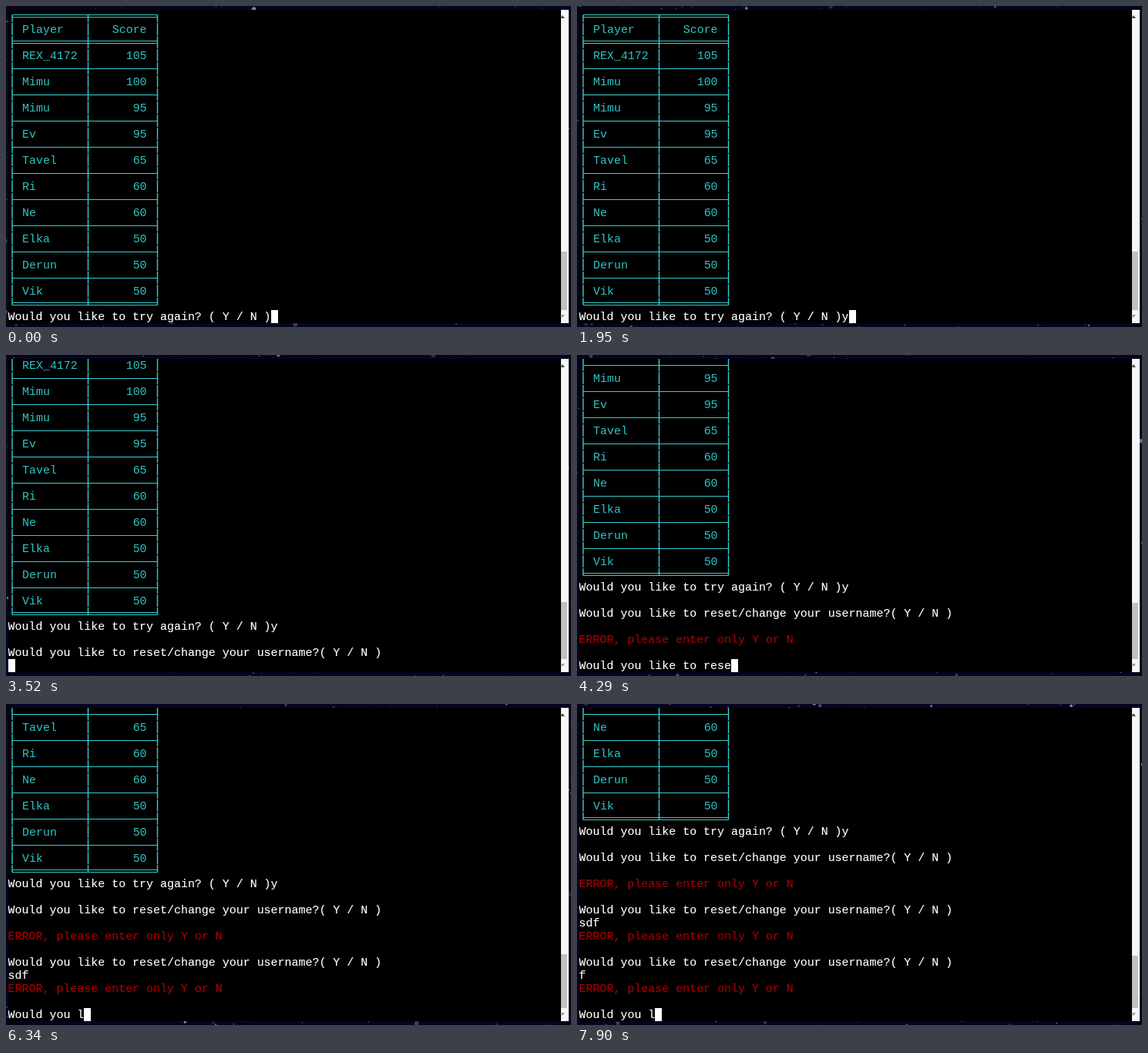
An HTML page with a canvas for the animation above (7.99 s loop, 733 px wide and 417 px high).

```html
<!DOCTYPE html>
<html lang="en">
<head>
<meta charset="utf-8">
<title>Terminal high scores</title>
<style>
html, body { margin: 0; width: 100%; height: 100%; overflow: hidden; background: #060320; }
#stage { position: relative; width: 733px; height: 417px; overflow: hidden; }
#sky { position: absolute; left: 0; top: 0; }
#term { position: absolute; left: 2.6px; top: 5px; width: 717.4px; height: 407px; background: #000; overflow: hidden; }
#log { position: absolute; left: 0; bottom: 0; width: 717px; font: 14.96px/19px "Courier New", "Liberation Mono", monospace; color: #fff; }
#log svg { display: block; }
#log text { fill: #2fc4c4; }
#out div { height: 17px; white-space: pre; -webkit-text-stroke: 0.15px; }
#out .error { color: #a80000; }
.cursor { display: inline-block; width: 9px; height: 17px; background: #fff; vertical-align: top; }
#bar { position: absolute; left: 720px; top: 5px; width: 10px; height: 407px; background: #f6f6f6; }
#thumb { position: absolute; left: 0; width: 8px; bottom: 17px; background: #c1c1c1; }
.arrow { position: absolute; left: -1px; border: 3px solid transparent; }
.up { top: 4px; border-bottom: 4px solid #505050; }
.down { bottom: 4px; border-top: 4px solid #a0a0a0; }
</style>
</head>
<body>
<div id="stage">
  <canvas id="sky" width="733" height="417"></canvas>
  <div id="term"><div id="log"><svg id="table" width="717" height="391"></svg><div id="out"></div></div></div>
  <div id="bar"><div id="thumb"></div><i class="arrow up"></i><i class="arrow down"></i></div>
</div>
<script>
const LOOP = 7990, ROW = 17, CHAR_MS = 12, STEP = 78;
const $ = id => document.getElementById(id);

const scores = [
  ["Player", "Score"], ["REX_4172", 105], ["Mimu", 100], ["Mimu", 95], ["Ev", 95], ["Tavel", 65],
  ["Ri", 60], ["Ne", 60], ["Elka", 50], ["Derun", 50], ["Vik", 50]
];

function drawTable() {
  const xs = [5, 103.5, 193.5], last = scores.length * 2;
  const upper = 7.5, middle = 9.5, lower = 10.5;
  let svg = "";
  const line = (x1, y1, x2, y2, w = 1) => {
    svg += `<path d="M${x1} ${y1}L${x2} ${y2}" stroke="#34cfd2" stroke-width="${w}"/>`;
  };
  for (let r = 0; r <= last; r++) {
    const y = r * ROW;
    const top = r ? y + 1 : y + upper, bottom = r < last ? y + ROW : y + lower;
    xs.forEach(x => line(x, top, x, bottom, 1.4));
    if (r % 2) {
      const [name, score] = scores[(r - 1) / 2];
      svg += `<text x="18" y="${y + 14}">${name}</text><text x="179.6" y="${y + 14}" text-anchor="end">${score}</text>`;
    } else if (r === 0 || r === 2 || r === last) {
      line(xs[0], y + upper, xs[2], y + upper);
      line(xs[0], y + lower, xs[2], y + lower);
    } else {
      line(xs[0], y + middle, xs[2], y + middle);
    }
  }
  $("table").innerHTML = svg;
}

// Each entry: start time, text, ms per character
const ASK = "Would you like to reset/change your username?( Y / N )\n";
const ERROR = "ERROR, please enter only Y or N\n\n";
const script = [
  [0, "Would you like to try again? ( Y / N )", 0],
  [900, "y", 0],
  [2390, "\n\n", 0],
  [2398, ASK, CHAR_MS],
  [3630, "\n", 0],
  [3632, ERROR, CHAR_MS],
  [4020, ASK, CHAR_MS],
  [5560, "sdf", 75],
  [5815, "\n", 0],
  [5818, ERROR, CHAR_MS],
  [6202, ASK, CHAR_MS],
  [7150, "f", 0],
  [7375, "\n", 0],
  [7378, ERROR, CHAR_MS],
  [7762, ASK, CHAR_MS]
];

function textAt(t) {
  let s = "";
  for (const [start, text, pace] of script) {
    if (t < start) break;
    s += pace ? text.slice(0, Math.floor((t - start) / pace)) : text;
  }
  return s;
}

let shown = null;
function drawLog(t) {
  const text = textAt(t);
  if (text === shown) return;
  shown = text;
  const lines = text.split("\n");
  $("out").innerHTML = lines.map((s, i) =>
    `<div${s.startsWith("E") ? ' class="error"' : ""}>${s}${i === lines.length - 1 ? '<i class="cursor"></i>' : ""}</div>`
  ).join("");
  $("thumb").style.height = 76 - (lines.length - 1) * 0.57 + "px";
}

let seed = 7;
const rand = () => (seed = (seed * 16807) % 2147483647) / 2147483647;
const stars = Array.from({ length: 1300 }, () => ({
  angle: rand() * Math.PI * 2, phase: rand(), speed: 0.04 + rand() * 0.1,
  size: 0.7 + rand() ** 4 * 2.4, light: 0.2 + rand() ** 2 * 0.6
}));
const sky = $("sky").getContext("2d");

function drawSky(t) {
  const sec = Math.floor(t / STEP) * STEP / 1000;
  sky.fillStyle = "#060320";
  sky.fillRect(0, 0, 733, 417);
  for (const s of stars) {
    const d = 150 + 310 * ((s.phase + sec * s.speed) % 1);
    sky.fillStyle = `rgba(190,180,220,${s.light})`;
    sky.beginPath();
    sky.arc(366 + Math.cos(s.angle) * d, 208 + Math.sin(s.angle) * d, s.size, 0, 7);
    sky.fill();
  }
}

function frame() {
  const t = performance.now() % LOOP;
  drawSky(t);
  drawLog(t);
  requestAnimationFrame(frame);
}
drawTable();
frame();
</script>
</body>
</html>
```
